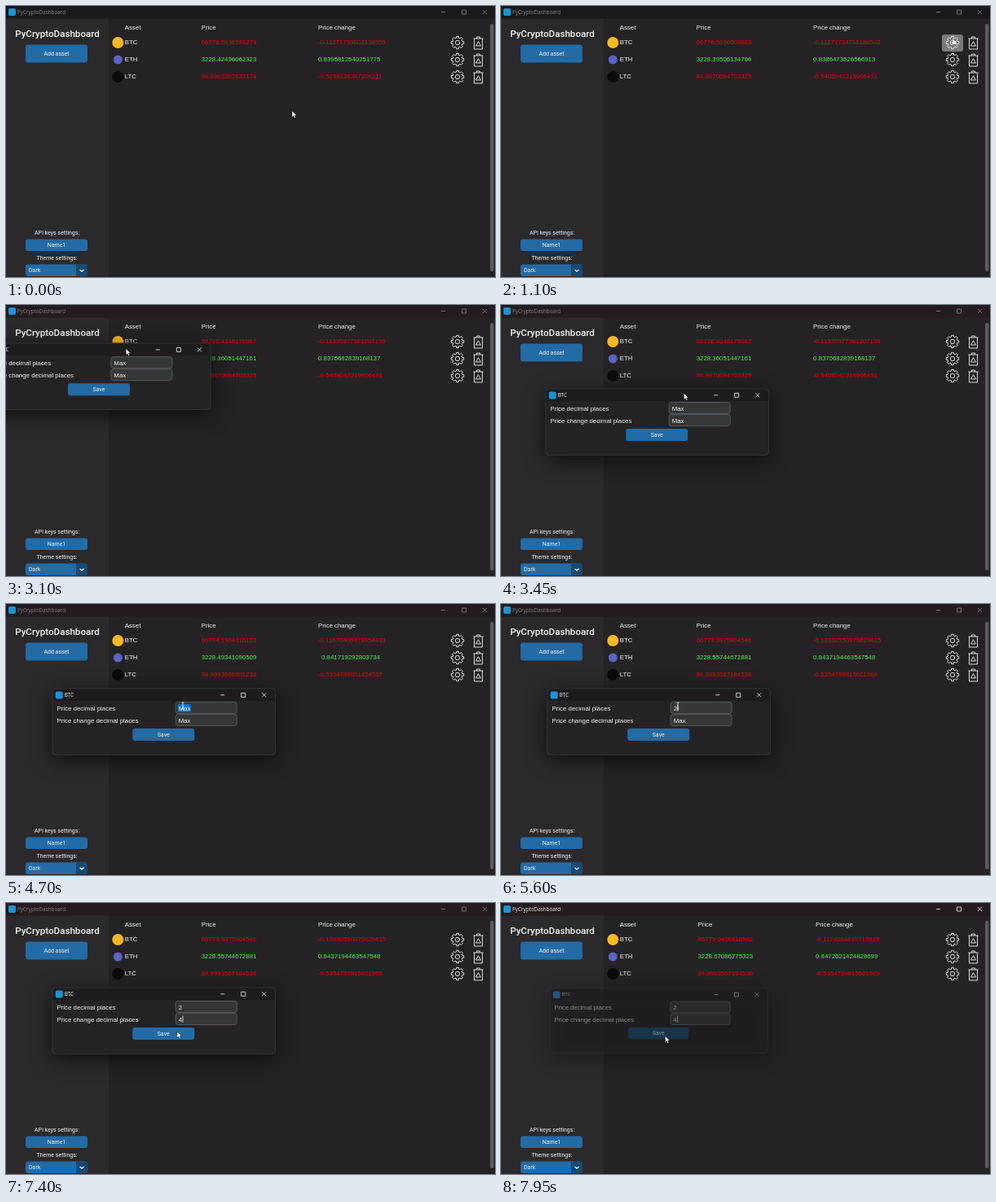
An HTML page with a canvas that plays this animation: 600 by 333 pixels, repeating every 8 s.

```html
<!DOCTYPE html>
<html lang="en">
<head>
<meta charset="utf-8">
<title>PyCryptoDashboard</title>
<style>
html, body { margin: 0; width: 100%; height: 100%; overflow: hidden; background: #242225; }
canvas { display: block; width: 600px; height: 333px; }
</style>
</head>
<body>
<canvas></canvas>
<script>
const LOOP = 8000, STEP = 50;
const canvas = document.querySelector('canvas');
const ctx = canvas.getContext('2d');
const ratio = window.devicePixelRatio || 1;
canvas.width = 600 * ratio;
canvas.height = 333 * ratio;

const UI = 'Roboto, sans-serif', TABLE = '"Liberation Sans", Arial, sans-serif', CAPTION = '"Open Sans", sans-serif';
const BLUE = '#236ba5', DARK_BLUE = '#174a72', RED = '#f40008', GREEN = '#44fa44', LIGHT = '#f2f3f5';

// Times at which new quotes arrive, and the quotes themselves.
const TICKS = [0, 650, 1800, 2900, 4100, 5500, 7700];
const COINS = [
  { name: 'BTC', color: '#f7b924', radius: 7, ink: RED,
    prices: ['66776.5936593279', '66776.5936503863', '66776.5936496661', '66776.4346176067',
      '66774.1904316122', '66773.9375904546', '66779.0456610562'],
    changes: ['-0.11271733602138559', '-0.11271734716186542', '-0.11271735840992629', '-0.11335977981207139',
      '-0.11670406479954433', '-0.12030550379629615', '-0.1124064895715915'] },
  { name: 'ETH', color: '#5c63c4', radius: 5.5, ink: GREEN,
    prices: ['3228.42496062323', '3228.39506134706', '3228.32196711988', '3228.36051447161',
      '3228.49341090509', '3228.55744672881', '3228.67086775323'],
    changes: ['0.8395812540251775', '0.8386473526566913', '0.8363642606378755', '0.8375682839168137',
      '0.841719292803734', '0.8437194463547548', '0.8472621424828699'] },
  { name: 'LTC', color: '#0b0a0c', radius: 7, ink: RED,
    prices: ['84.9969267633174', '84.9870684703325', '84.9870684703325', '84.9870684703325',
      '84.9993966601236', '84.9993567184536', '84.9993567184536'],
    changes: ['-0.5258128387206211', '-0.5408042219906491', '-0.5408042219906491', '-0.5408042219906491',
      '-0.5354799851454557', '-0.5354799815601969', '-0.5354799815601969'] },
];

// Keyframes: [time, x, y]
const POINTER = [
  [0, 351, 129], [150, 351, 129], [600, 564, 48], [850, 554, 39], [1650, 554, 39], [1750, 547, 37],
  [2250, 20, -3], [2550, 5, -47], [2650, 5, -47], [3400, 224.5, 108.5], [3450, 224.5, 108.5], [3550, 226.5, 109.5],
  [3800, 226.5, 109.5], [4250, 217, 125], [5700, 217, 125], [6150, 228, 146],
  [7150, 228, 146], [7550, 201.5, 163.5],
];
const DIALOG = [[0, -165, -56], [2650, -165, -56], [3400, 54.7, 102.6], [3450, 54.7, 102.6], [3550, 56.7, 103.6]];

const clamp = v => Math.max(0, Math.min(1, v));
const between = (t, from, to) => t >= from && t < to;

function follow(keys, t) {
  const next = keys.findIndex(key => key[0] > t);
  if (next < 0) return keys.at(-1).slice(1);
  const [t0, x0, y0] = keys[next - 1], [t1, x1, y1] = keys[next];
  const p = (t - t0) / (t1 - t0), ease = p * p * (3 - 2 * p);
  return [x0 + (x1 - x0) * ease, y0 + (y1 - y0) * ease];
}

// y is the middle of the capital letters.
function text(str, x, y, size, family, color = LIGHT, align = 'left', weight = 400) {
  ctx.font = `${weight} ${size}px ${family}`;
  ctx.fillStyle = color;
  ctx.textAlign = align;
  ctx.fillText(str, x, y + size * 0.36 - 0.4);
}

function box(x, y, w, h, radius, fill, stroke) {
  ctx.beginPath();
  ctx.roundRect(x, y, w, h, radius);
  ctx.fillStyle = fill;
  ctx.fill();
  if (stroke) line(stroke, 1);
}

function line(color, width) {
  ctx.strokeStyle = color;
  ctx.lineWidth = width;
  ctx.stroke();
}

function strokePath(d, x, y, color, width) {
  ctx.save();
  ctx.translate(x, y);
  ctx.strokeStyle = color;
  ctx.lineWidth = width;
  ctx.stroke(new Path2D(d));
  ctx.restore();
}

function disc(x, y, r, color) {
  ctx.beginPath();
  ctx.arc(x, y, r, 0, 7);
  ctx.fillStyle = color;
  ctx.fill();
}

function button(label, x, y, w, h, fill = BLUE) {
  box(x, y, w, h, 3, fill);
  text(label, x + w / 2, y + h / 2, 7, UI, LIGHT, 'center');
}

function windowControls(x, y, color) {
  strokePath('M-2.5 0h5 M23 -2.5h5v5h-5z M48.5 -2.5l5 5m0 -5l-5 5', x, y, color, 0.8);
}

function gear(x, y) {
  ctx.beginPath();
  for (let tooth = 0; tooth < 8; tooth++) {
    for (const [offset, r] of [[-0.27, 6], [-0.17, 7.8], [0.17, 7.8], [0.27, 6]]) {
      const a = tooth * Math.PI / 4 + offset;
      ctx.lineTo(x + r * Math.cos(a), y + r * Math.sin(a));
    }
  }
  ctx.closePath();
  line('#eee', 0.9);
  ctx.beginPath();
  ctx.arc(x, y, 2.7, 0, 7);
  line('#eee', 0.9);
}

function trash(x, y) {
  strokePath('M-6 -5.5h12 M-2 -5.5v-2h4v2 M-5 -5.5v13h10v-13 M0 -1.8l3 5.3h-6z', x, y, '#eee', 0.9);
}

function drawMain(t) {
  const tick = TICKS.findLastIndex(time => time <= t);
  const shifted = tick === 6;
  const priceX = shifted ? 241.5 : 239.7, changeX = shifted ? 386 : 383;
  const caption = t >= 7850 ? '#f2f2f2' : '#8a878b';

  box(0, 0, 600, 333, 0, '#242225');
  box(0, 15, 126, 318, 0, '#2b292b');
  box(0, 0, 600, 15.5, 0, t < 1350 ? '#19191c' : '#231b1d');
  box(3, 3, 9, 9, 2, '#1c94d2');
  text('PyCryptoDashboard', 14, 7.7, 6.3, CAPTION, caption);
  windowControls(536.5, 7.5, caption);

  text('PyCryptoDashboard', 63, 34.2, 11.6, UI, LIGHT, 'center', 500);
  button('Add asset', 24, 47.5, 76, 22);
  text('API keys settings:', 62.5, 279, 7, UI, LIGHT, 'center');
  button('Name1', 24, 286.5, 76, 14.5);
  text('Theme settings:', 62.5, 310, 7, UI, LIGHT, 'center');
  box(24, 317.5, 76, 14.5, 3, BLUE);
  box(86, 317.5, 14, 14.5, [0, 3, 3, 0], DARK_BLUE);
  text('Dark', 28, 325, 7, UI);
  strokePath('M-2.5 -1l2.5 2.2l2.5 -2.2', 93, 325, LIGHT, 1.2);

  text('Asset', 145.7, 26.8, 7.85, TABLE);
  text('Price', priceX, 26.8, 7.85, TABLE);
  text('Price change', changeX, 26.8, 7.85, TABLE);
  if (between(t, 750, 1650)) box(541, 35, 26, 21, 3, '#7b797b');
  COINS.forEach((coin, row) => {
    const y = 45 + row * 21;
    const change = coin.changes[tick];
    // A shorter figure sits further right in its cell.
    const indent = coin.name === 'ETH' && change.length < 18 ? 4 : 0;
    disc(137.3, y, coin.radius, coin.color);
    text(coin.name, 145.7, y, 7.85, TABLE);
    text(coin.prices[tick], priceX, y, 7.85, TABLE, coin.ink);
    text(change, changeX + indent, y, 7.85, TABLE, coin.ink);
    gear(554, y);
    trash(579.5, y + 0.5);
  });
  box(594, 22, 4.5, 304, 2, '#5d5b5e');
}

function entry(y, value, selected, caret) {
  box(151.5, y, 75, 14, 3, '#343638', '#565b5e');
  if (selected) box(154.5, y + 2.5, 15.5, 9.5, 0, '#0f7ad4');
  text(value, 155, y + 7.6, 7.85, TABLE);
  if (caret) box(155.5 + ctx.measureText(value).width, y + 3, 0.8, 8.5, 0, LIGHT);
}

function drawDialog(t) {
  const opening = clamp((t - 1350) / 150), closing = clamp((t - 7850) / 200);
  if (!opening) return;
  const [x, y] = follow(DIALOG, t);
  const scale = 1 - 0.045 * closing;
  ctx.save();
  ctx.globalAlpha = opening * (1 - closing);
  ctx.translate(x + 137, y + 41);
  ctx.scale(scale, scale);
  ctx.translate(-137, -41);

  ctx.save();
  ctx.shadowColor = 'rgba(0,0,0,.65)';
  ctx.shadowBlur = 24 * ratio;
  ctx.shadowOffsetY = 6 * ratio;
  box(0, 0, 274, 82, 4, '#242225');
  ctx.restore();
  box(0, 0, 274, 15.5, [4, 4, 0, 0], '#1d1b1e');
  ctx.beginPath();
  ctx.roundRect(0.25, 0.25, 273.5, 81.5, 4);
  line('#464448', 0.6);

  box(4, 4, 9, 9, 2, '#1c94d2');
  text('BTC', 15, 8.3, 6.3, CAPTION);
  windowControls(209, 8.2, LIGHT);
  text('Price decimal places', 5.8, 24.5, 7.85, TABLE);
  text('Price change decimal places', 5.8, 39.5, 7.85, TABLE);
  entry(17, t < 5300 ? 'Max' : '2', between(t, 4400, 5300), between(t, 5300, 6150));
  entry(32, t < 7000 ? 'Max' : '4', between(t, 6350, 7000), t >= 7000);
  button('Save', 98.5, 49.5, 76, 15, t >= 7500 ? DARK_BLUE : BLUE);
  ctx.restore();
}

function drawPointer(t) {
  const [x, y] = follow(POINTER, t);
  const overEntry = between(t, 4150, 5850) || between(t, 6050, 7300);
  const overGear = between(t, 750, 1650);
  if (overEntry) {
    strokePath('M-1.5 -4h3 M0 -4v8 M-1.5 4h3', x, y, '#f4f4f4', 0.8);
    return;
  }
  const shape = overGear
    ? 'M0 0q1 -1 1.6 0v3l3 .7q1 .3 .8 1.5l-.6 3.3h-4.5l-2.3 -3.5q.3 -1 1.2 -.4l.8 .8z'
    : 'M0 0v7.6l1.8 -1.6l1.2 2.7l1.3 -.6l-1.2 -2.6h2.4z';
  ctx.save();
  ctx.translate(x, y);
  ctx.fillStyle = '#fff';
  ctx.fill(new Path2D(shape));
  ctx.restore();
  strokePath(shape, x, y, '#111', 0.4);
}

function frame(now) {
  const t = Math.floor(now % LOOP / STEP) * STEP;
  ctx.setTransform(ratio, 0, 0, ratio, 0, 0);
  drawMain(t);
  drawDialog(t);
  drawPointer(t);
  requestAnimationFrame(frame);
}
requestAnimationFrame(frame);
</script>
</body>
</html>
```
